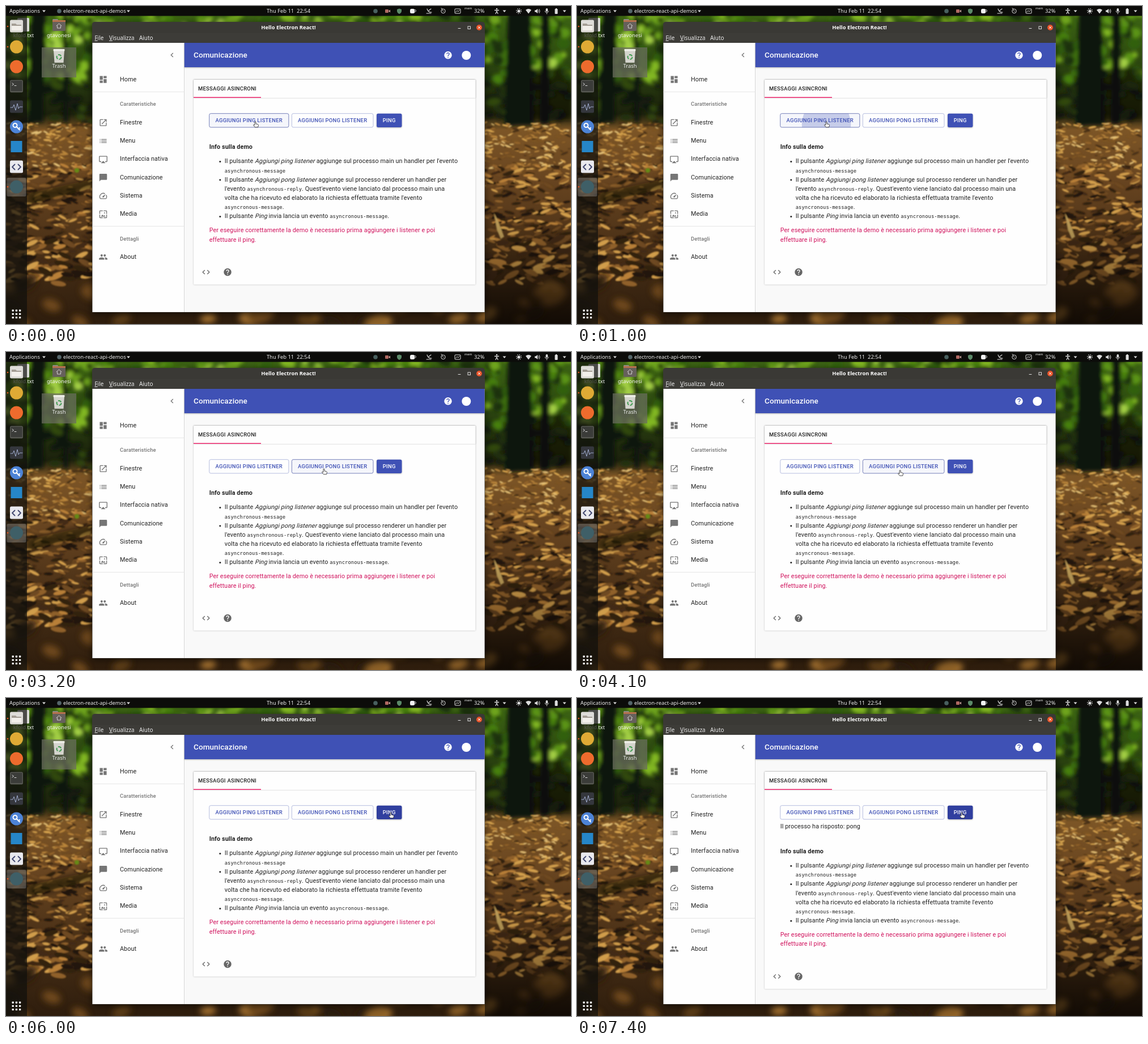
An HTML page that plays this animation: 997x561 px, repeating every 7.9 s.

```html
<!DOCTYPE html>
<html lang="it">
<head>
<meta charset="utf-8">
<title>Hello Electron React!</title>
<style>
  html, body { margin: 0; width: 100%; height: 100%; overflow: hidden; background: #000; }
  svg { display: block; width: 100vw; height: 100vh; }
  text { white-space: pre; }
  .desk { font: 9.4px "Noto Sans", "Open Sans", sans-serif; fill: #eee; }
  .body { font: 10.78px Roboto, sans-serif; letter-spacing: .101px; fill: #212121; }
  .label { font: 500 9.43px Roboto, sans-serif; letter-spacing: .27px; }
  .sub { font: 500 9.43px Roboto, sans-serif; letter-spacing: .1px; fill: #757575; }
  .head { font: 500 13.47px Roboto, sans-serif; letter-spacing: .1px; fill: #fff; }
  .code { font: 8.76px "DejaVu Sans Mono", monospace; }
  .mid { text-anchor: middle; }
  .card { filter: drop-shadow(0 .9px .8px rgba(0,0,0,.28)); }
  .bar { filter: drop-shadow(0 1.2px 1.2px rgba(0,0,0,.28)); }
</style>
</head>
<body>
<svg id="stage" viewBox="0 0 997 561"></svg>
<script>
const LOOP = 7900, STEP = 100, UI = 0.6737;
const REPLY_AT = 6500, REPLY_SHIFT = 21.7;
const INDIGO = '#3f51b5', GREY = '#757575';

const ICONS = {
  dashboard: 'M3 13h8V3H3zm0 8h8v-6H3zm10 0h8V11h-8zm0-18v6h8V3z',
  launch: 'M19 19H5V5h7V3H5c-1.1 0-2 .9-2 2v14c0 1.1.9 2 2 2h14c1.1 0 2-.9 2-2v-7h-2zM14 3v2h3.6l-9.8 9.8 1.4 1.4L19 6.4V10h2V3z',
  list: 'M3 13h2v-2H3zm0 4h2v-2H3zm0-8h2V7H3zm4 4h14v-2H7zm0 4h14v-2H7zM7 7v2h14V7z',
  screen: 'M6 22h12l-6-6zM21 3H3c-1.1 0-2 .9-2 2v12c0 1.1.9 2 2 2h4v-2H3V5h18v12h-4v2h4c1.1 0 2-.9 2-2V5c0-1.1-.9-2-2-2z',
  chat: 'M20 2H4c-1.1 0-2 .9-2 2v18l4-4h14c1.1 0 2-.9 2-2V4c0-1.1-.9-2-2-2z',
  speed: 'M20.4 8.6l-1.2 1.8a8 8 0 0 1-.3 7.6H5.1A8 8 0 0 1 15.6 6.9l1.8-1.3A10 10 0 0 0 3.4 19a2 2 0 0 0 1.7 1h13.8a2 2 0 0 0 1.8-1 10 10 0 0 0-.3-10.4zm-9.8 6.8a2 2 0 0 0 2.8 0l5.7-8.5-8.5 5.7a2 2 0 0 0 0 2.8z',
  media: 'M4 4h7V2H4c-1.1 0-2 .9-2 2v7h2zm6 9l-4 5h12l-3-4-2 2.7zm7-4.5a1.5 1.5 0 1 0-3 0 1.5 1.5 0 0 0 3 0zM20 2h-7v2h7v7h2V4c0-1.1-.9-2-2-2zm0 18h-7v2h7c1.1 0 2-.9 2-2v-7h-2zM4 13H2v7c0 1.1.9 2 2 2h7v-2H4z',
  people: 'M16 11a3 3 0 1 0 0-6 3 3 0 0 0 0 6zm-8 0a3 3 0 1 0 0-6 3 3 0 0 0 0 6zm0 2c-2.3 0-7 1.2-7 3.5V19h14v-2.5C15 14.2 10.3 13 8 13zm8 0l-1 .1c1.2.8 2 1.9 2 3.4V19h6v-2.5c0-2.3-4.7-3.5-7-3.5z',
  help: 'M12 2a10 10 0 1 0 0 20 10 10 0 0 0 0-20zm1 17h-2v-2h2zm2.1-7.8l-.9.9C13.4 12.9 13 13.5 13 15h-2v-.5c0-1.1.4-2.1 1.2-2.8l1.2-1.3c.4-.4.6-.9.6-1.4a2 2 0 0 0-4 0H8a4 4 0 0 1 8 0c0 .9-.4 1.7-.9 2.2z',
  code: 'M9.4 16.6L4.8 12l4.6-4.6L8 6l-6 6 6 6zm5.2 0l4.6-4.6-4.6-4.6L16 6l6 6-6 6z',
  back: 'M15.4 7.4L14 6l-6 6 6 6 1.4-1.4L10.8 12z'
};

const rect = (x, y, w, h, fill, extra = '') =>
  `<rect x="${x}" y="${y}" width="${w}" height="${h}" fill="${fill}" ${extra}/>`;
const circle = (x, y, r, fill, extra = '') =>
  `<circle cx="${x}" cy="${y}" r="${r}" fill="${fill}" ${extra}/>`;
const path = (d, fill, extra = '') => `<path d="${d}" fill="${fill}" ${extra}/>`;
const line = (d, color, width = 1) =>
  path(d, 'none', `stroke="${color}" stroke-width="${width}" stroke-linecap="round" stroke-linejoin="round"`);
const text = (x, y, cls, content, extra = '') =>
  `<text x="${x}" y="${y}" class="${cls}" ${extra}>${content}</text>`;
const icon = (name, cx, cy, fill = GREY) =>
  path(ICONS[name], fill, `transform="translate(${cx} ${cy}) scale(${UI}) translate(-12 -12)"`);
const code = s => `<tspan class="code">${s}</tspan>`;

let seed = 11;
const rnd = () => (seed = (seed * 16807) % 2147483647) / 2147483647;
const between = (a, b) => a + (b - a) * rnd();

function scatter(n, x0, x1, y0, y1, size, flat, colors) {
  let out = '';
  for (let i = 0; i < n; i++) {
    const x = between(x0, x1), y = between(y0, y1), r = size * between(.5, 1.4);
    const fill = colors[Math.floor(rnd() * colors.length)];
    out += `<ellipse rx="${r.toFixed(1)}" ry="${(r * flat).toFixed(1)}" fill="${fill}" ` +
      `transform="translate(${x.toFixed(1)} ${y.toFixed(1)}) rotate(${between(-30, 30).toFixed(0)})"/>`;
  }
  return out;
}

function forest() {
  const greens = ['#5c9414', '#82b822', '#31600f', '#1a330c', '#a3cf45', '#47800f', '#6fa51c'];
  const shadeGreens = ['#20300f', '#121c0a', '#31480f', '#0d1308'];
  const sunlit = ['#b8843a', '#d9a650', '#7d5424', '#4a3016', '#94652c', '#e3c076'];
  const litter = ['#8f602a', '#b87f38', '#432a13', '#241509', '#6e4820', '#322010', '#d09d4c'];
  const bokeh = ['#8a5f27', '#5c3d18', '#a87430', '#2a1a0b', '#704a1d'];
  const sides = [[0, 156], [840, 997]];
  const strip = (n, ...rest) => sides.map(([a, b]) => scatter(n, a, b, ...rest)).join('');
  return `<defs>
    <linearGradient id="wood" x2="0" y2="1">
      <stop offset="0" stop-color="#3f6a14"/><stop offset=".2" stop-color="#2a4210"/>
      <stop offset=".34" stop-color="#1c210d"/><stop offset=".39" stop-color="#7c5526"/>
      <stop offset=".55" stop-color="#674420"/><stop offset=".75" stop-color="#4b3117"/>
      <stop offset="1" stop-color="#2e1d0d"/>
    </linearGradient>
    <linearGradient id="shade" x2="0" y2="1">
      <stop offset="0" stop-opacity="0"/><stop offset="1" stop-opacity=".6"/>
    </linearGradient>
    <filter id="far" x="-20%" y="-20%" width="140%" height="140%"><feGaussianBlur stdDeviation="3"/></filter>
    <filter id="near"><feGaussianBlur stdDeviation=".8"/></filter>
    <filter id="glow" x="-20%" y="-20%" width="140%" height="140%"><feGaussianBlur stdDeviation="6"/></filter>
    </defs>` +
    rect(0, 0, 997, 561, 'url(#wood)') +
    `<g filter="url(#far)">${strip(80, 10, 130, 9, .9, greens)}${strip(45, 125, 205, 11, .5, shadeGreens)}
      ${scatter(60, 150, 845, 14, 34, 11, .6, greens)}
      ${path('M44 0H70L66 205H40ZM100 0H107L110 205H101ZM886 0H924L932 210H880ZM944 0H960L958 208H942Z', '#11150a')}
      ${path('M924 110H997V202H924Z', '#0d1008', 'opacity=".6"')}</g>` +
    `<g filter="url(#near)">${strip(240, 206, 290, 5, .28, sunlit)}${strip(230, 280, 420, 8, .28, litter)}
      ${strip(110, 410, 490, 11, .35, litter)}
      ${path('M861 365L868 378 879 407 873 411 866 394Z', '#b99a57')}
      ${circle(125, 290, 4, '#668a14')}</g>` +
    `<g filter="url(#glow)">${scatter(50, 0, 997, 480, 561, 19, .6, bokeh)}
      ${path('M37 330L152 305V322L37 352Z', '#140c06', 'opacity=".6"')}</g>` +
    rect(845, 380, 152, 181, 'url(#shade)');
}

function desktop() {
  return rect(20, 21, 21, 24, '#d8d8d4', 'rx="1.5"') +
    text(31, 54.5, 'desk mid', 'kfold.txt') +
    rect(82, 23, 10, 6, '#8d8a84', 'rx="1.5"') + rect(82, 25, 23, 19, '#66605b', 'rx="2"') +
    rect(82, 25, 23, 3, '#b7714d') +
    line('M89 35L93.500 31 98 35M90.500 35V39H96.500V35', '#ddd', .9) +
    text(93.5, 54.5, 'desk mid', 'gtavonesi') +
    rect(63, 73, 61, 53, '#6b6d60', 'opacity=".72"') +
    path('M84 78H103L101.500 100H85.500Z', '#d4d4cd') + rect(83.5, 76, 20, 3.5, '#eeeee8', 'rx="1"') +
    circle(93.5, 90, 4, 'none', 'stroke="#3f9b50" stroke-width="2" stroke-dasharray="6 2.400"') +
    text(93.5, 109, 'desk mid', 'Trash');
}

function dock() {
  const tile = (y, fill) => rect(7, y - 11.5, 23, 22, fill, 'rx="2.5"');
  let dots = '';
  for (let i = 0; i < 9; i++)
    dots += rect(10.5 + (i % 3) * 6.2, 535.5 + Math.floor(i / 3) * 6.2, 3.4, 3.4, '#f2f2f2', 'rx=".8"');
  return rect(0, 17, 37, 544, '#11100e', 'opacity=".7"') +
    rect(1.5, 303, 34, 33, '#fff', 'opacity=".22" rx="2"') +
    tile(36, '#dedcd8') + path('M10 31H17L19 33H27V43H10Z', '#a49d94') + rect(10, 35, 17, 8, '#f2efea') +
    circle(18.5, 72, 11.5, '#dfaa35') + circle(18.5, 107, 11.5, '#ee6b2d') +
    tile(142, '#565752') + rect(8.5, 132, 20, 18, '#3b3c39') + line('M11 136L13.500 138 11 140M15 140.500H18', '#eee', .9) +
    tile(178, '#35373d') + line('M8 179H12L14 174 17 184 20 172 22 181 24 178H29', '#a9b5d8', .9) +
    circle(18.5, 213, 11.5, '#4d83d6') + circle(16, 210.5, 3.5, 'none', 'stroke="#fff" stroke-width="2"') +
    line('M18.500 213L24 218.500M22 217L24 215', '#fff', 2) +
    rect(8.5, 238, 20, 20, '#2686c8') +
    tile(284, '#e9e9ee') + line('M15.500 279.500L11 284 15.500 288.500M21.500 279.500L26 284 21.500 288.500', '#40466f', 1.8) +
    circle(18.5, 319, 11.5, '#3f5f67') +
    [36, 72, 319].map(y => circle(3, y, 1.3, '#e95420')).join('') + dots;
}

function topBar() {
  const caret = x => path(`M${x - 3} 7.500H${x + 3}L${x} 11Z`, '#ddd');
  const w = '#ddd';
  return rect(0, 0, 997, 17.5, '#0c0c0a') +
    text(6, 12.3, 'desk', 'Applications') + caret(67) +
    circle(94, 9, 3.8, '#55666a') + text(101, 12.3, 'desk', 'electron-react-api-demos') + caret(216) +
    text(498.5, 12.3, 'desk mid', 'Thu Feb 11  22:54') +
    circle(652, 9, 3.8, '#48605f') +
    rect(669, 6, 6, 6, '#b06862', 'rx="1"') + path('M675 9L678 6.500V11.500Z', '#d0a8a2') +
    path('M690 6L694 4.500 698 6V9Q698 12 694 14 690 12 690 9Z', '#5c8a69') +
    rect(713, 5, 8, 8, '#f2f2f2', 'rx="2.500"') + circle(721.5, 8.5, 1.8, 'none', 'stroke="#f2f2f2"') +
    line('M743 5Q745 12 751 11M742 13H750M746 8L750 5', w, 1.1) +
    circle(771.5, 9, 3.7, 'none', `stroke="${w}"`) + line('M770 7L772 9.500M768 4L770 5', w) +
    rect(792, 5, 10, 8, 'none', `stroke="${w}" rx="1"`) + line('M793.500 11L796 8 798 10 800.500 7', w, .9) +
    text(809, 5.7, 'desk', 'mem', 'style="font-size:5.500px"') + text(826, 12.3, 'desk', '32%') +
    circle(866, 5, 1.3, w) + line('M862.500 7.500H869.500M866 7.500V10M866 9.500L864 13.500M866 9.500L868 13.500', w, 1.3) + caret(879.5) +
    circle(905, 9, 2.6, w) + circle(905, 9, 4.3, 'none', `stroke="${w}" stroke-width="1.300" stroke-dasharray="1.400 1.980"`) +
    path('M917 7Q922 3 927 7L922 13.500Z', w) +
    path('M933 7.500H935L938 5V13L935 10.500H933Z', w) + line('M939.500 7Q941 9 939.500 11M941 5.500Q943.500 9 941 12.500', w, .9) +
    rect(952.5, 4, 3.6, 6, w, 'rx="1.800"') + line('M951 9Q951 11.500 954.300 11.500 957.500 11.500 957.500 9M954.300 11.500V14', w, .9) +
    rect(968.5, 5, 5, 9, w, 'rx="1"') + rect(970, 4, 2, 2, w) + caret(985.5);
}

function windowFrame() {
  return rect(151, 30, 695, 514, '#000', 'filter="url(#glow)" opacity=".55"') +
    path('M152 540.500V33Q152 28 157 28H840Q845 28 845 33V540.500Z', '#3a3935') +
    rect(152, 47.5, 693, 17.5, '#3d3c38') +
    text(498.5, 41.3, 'desk mid', 'Hello Electron React!', 'style="font-size:9.350px;font-weight:700;fill:#fff"') +
    line('M798 39.500H802', '#ddd') + rect(815, 36, 4.5, 4.5, 'none', 'stroke="#ddd"') +
    circle(835, 38, 5, '#e9552a') + line('M833.200 36.200L836.800 39.800M836.800 36.200L833.200 39.800', '#fff', .9) +
    [[156.5, 'F', 'ile'], [182, 'V', 'isualizza'], [235, '', 'Aiuto']].map(([x, key, rest]) =>
      text(x, 59.7, 'desk', `<tspan text-decoration="underline">${key}</tspan>${rest}`, 'style="font-size:9.850px"')).join('');
}

function sidebar() {
  const item = (y, name, label) => icon(name, 171.5, y + .8) + text(201, y + 3.8, 'body', label);
  const rows = [['launch', 'Finestre'], ['list', 'Menu'], ['screen', 'Interfaccia nativa'],
    ['chat', 'Comunicazione'], ['speed', 'Sistema'], ['media', 'Media']];
  return rect(152.5, 65, 162, 475, '#fefefe') + rect(314, 65, .8, 475, '#dcdcdc') +
    icon('back', 293, 86.5) + item(128.8, 'dashboard', 'Home') +
    rect(152.5, 151, 162, .8, '#e0e0e0') + text(201, 176, 'sub', 'Caratteristiche') +
    rows.map(([name, label], i) => item(205 + i * 32.33, name, label)).join('') +
    rect(152.5, 388, 162, .8, '#e0e0e0') + text(201, 413.6, 'sub', 'Dettagli') +
    item(442, 'people', 'About');
}

const BUTTONS = [
  { label: 'AGGIUNGI PING LISTENER', x: 358.7, w: 140.2, click: 800, at: [440, 208], reach: 84 },
  { label: 'AGGIUNGI PONG LISTENER', x: 504.3, w: 143.7, click: 3300, at: [561, 208], reach: 88 },
  { label: 'PING', x: 654, w: 44.5, click: 6400, at: [679, 204], reach: 30, solid: true }
];
const TOP = 189.7, TALL = 24.3;

function buttonMarkup(b, i) {
  const ink = b.solid ? '#fff' : INDIGO;
  const box = (fill, extra) => rect(b.x, TOP, b.w, TALL, fill, `rx="2.7" ${extra}`);
  return `<clipPath id="clip${i}">${box('#000', '')}</clipPath>` +
    box(b.solid ? INDIGO : 'transparent', `id="button${i}" ${b.solid ? 'class="bar"' : 'stroke-width=".8"'}`) +
    `<g clip-path="url(#clip${i})">${circle(...b.at, 0, ink, `id="ripple${i}"`)}</g>` +
    text(b.x + (b.solid ? 10.7 : 10.8), 205, 'label', b.label, `fill="${ink}"`);
}

function content() {
  // Underscores mark the slanted runs.
  const lines = [
    `Il pulsante _Aggiungi ping listener_ aggiunge sul processo main un handler per l'evento`,
    code('asynchronous-message'),
    `Il pulsante _Aggiungi pong listener_ aggiunge sul processo renderer un handler per`,
    `l'evento ${code('asynchronous-reply')}. Quest'evento viene lanciato dal processo main una`,
    `volta che ha ricevuto ed elaborato la richiesta effettuata tramite l'evento`,
    `${code('asyncronous-message')}.`,
    `Il pulsante _Ping_ invia lancia un evento ${code('asyncronous-message')}.`
  ];
  const baseline = i => 277.4 + i * 16.17;
  const runs = (s, i) => `<g class="line" data-y="${baseline(i)}">` +
    s.split('_').map(run => text(0, 0, 'body', run)).join('') + '</g>';
  const red = 'style="fill:#d0115c"';
  return rect(314.8, 65, 529.7, 475, '#f9f9f9') +
    `<g class="bar">${rect(314.8, 65, 529.7, 43, INDIGO)}</g>` +
    text(331, 90.6, 'head', 'Comunicazione') + icon('help', 780, 86.7, '#fff') + circle(812.3, 87, 8, '#fff') +
    rect(331, 130, 497.5, 361.5, '#fefefe', 'id="card" class="card" rx="1.5"') +
    `<g class="card">${rect(331, 130, 497.5, 32, '#fefefe', 'rx="1"')}</g>` +
    text(339, 148.8, 'label', 'MESSAGGI ASINCRONI', 'fill="#212121"') +
    rect(331, 160.6, 119, 1.4, '#ec1763') +
    BUTTONS.map(buttonMarkup).join('') +
    text(358.7, 230.3, 'body', 'Il processo ha risposto: pong', 'id="reply"') +
    `<g id="info">${text(358.7, 251.9, 'body', 'Info sulla demo', 'style="font-weight:700"')}
      ${lines.map(runs).join('')}
      ${[0, 2, 6].map(i => circle(377.8, baseline(i) - 2.9, 1.5, '#212121')).join('')}
      ${text(358.7, 399.4, 'body', 'Per eseguire correttamente la demo è necessario prima aggiungere i listener e poi', red)}
      ${text(358.7, 415.6, 'body', 'effettuare il ping.', red)}
      ${icon('code', 353, 469.5, '#666')}${icon('help', 391, 469.5, '#666')}</g>`;
}

// Sets the runs of a line one after another; every second run is slanted.
function layOutLine(group) {
  let x = 385.7;
  [...group.children].forEach((run, i) => {
    run.setAttribute('transform', `translate(${x} ${group.dataset.y}) skewX(${i % 2 ? -14 : 0})`);
    x += run.getComputedTextLength();
  });
}

const pointer =
  path('M0 0V8L1.900 6.400 3.200 9.200 4.600 8.500 3.300 5.900 5.800 5.700Z', '#222', 'id="arrow" stroke="#fff" stroke-width=".5"') +
  path('M-1 .6Q0-.6 1 .6V4L4.500 4.800Q5.600 5.200 5.400 6.500L4.600 9.800H-.6L-3.400 6.400Q-3.600 5.200-2.400 5.300L-1 6.200Z',
    '#fff', 'id="hand" stroke="#222" stroke-width=".8"');

const stage = document.getElementById('stage');
stage.innerHTML = forest() + desktop() + dock() + topBar() + windowFrame() + sidebar() + content() +
  `<g id="pointer">${pointer}</g>`;
stage.querySelectorAll('.line').forEach(layOutLine);

const $ = id => document.getElementById(id);
const set = (id, attrs) => {
  for (const name in attrs) $(id).setAttribute(name, attrs[name]);
};
const clamp = v => Math.min(1, Math.max(0, v));
const smooth = p => p * p * (3 - 2 * p);

// Pointer stops: time, x, y of the hot spot.
const STOPS = [[0, 440, 204], [1500, 440, 204], [2200, 518.5, 230], [2700, 561, 206],
  [3900, 561, 206], [4900, 648.5, 230], [5700, 679, 202], [LOOP, 679, 202]];

function pointerAt(t) {
  const i = STOPS.findIndex(s => s[0] > t);
  const [t0, x0, y0] = STOPS[i - 1], [t1, x1, y1] = STOPS[i];
  const p = smooth((t - t0) / (t1 - t0));
  return [x0 + (x1 - x0) * p, y0 + (y1 - y0) * p];
}

function draw(t) {
  const [x, y] = pointerAt(t);
  let overButton = false;
  BUTTONS.forEach((b, i) => {
    const hover = x > b.x && x < b.x + b.w && y > TOP && y < TOP + TALL;
    overButton = overButton || hover;
    set('button' + i, b.solid
      ? { fill: hover ? '#303f9f' : INDIGO }
      : { fill: hover ? '#f5f6fb' : '#fefefe', stroke: hover ? '#5360a8' : '#a3abd6' });
    const p = clamp((t - b.click) / 550);
    set('ripple' + i, {
      r: b.reach * (1 - (1 - p) ** 1.6),
      opacity: .26 * clamp((1 - p) / .62)
    });
  });
  set('pointer', { transform: `translate(${x} ${y})` });
  set('hand', { visibility: overButton ? 'visible' : 'hidden' });
  set('arrow', { visibility: overButton ? 'hidden' : 'visible' });

  const replied = t >= REPLY_AT;
  const shift = replied ? REPLY_SHIFT : 0;
  set('reply', { visibility: replied ? 'visible' : 'hidden' });
  set('info', { transform: `translate(0 ${shift})` });
  set('card', { height: 361.5 + shift });
}

const start = performance.now();
function tick() {
  const t = (performance.now() - start) % LOOP;
  draw(Math.floor(t / STEP) * STEP);
  requestAnimationFrame(tick);
}
tick();
</script>
</body>
</html>
```
